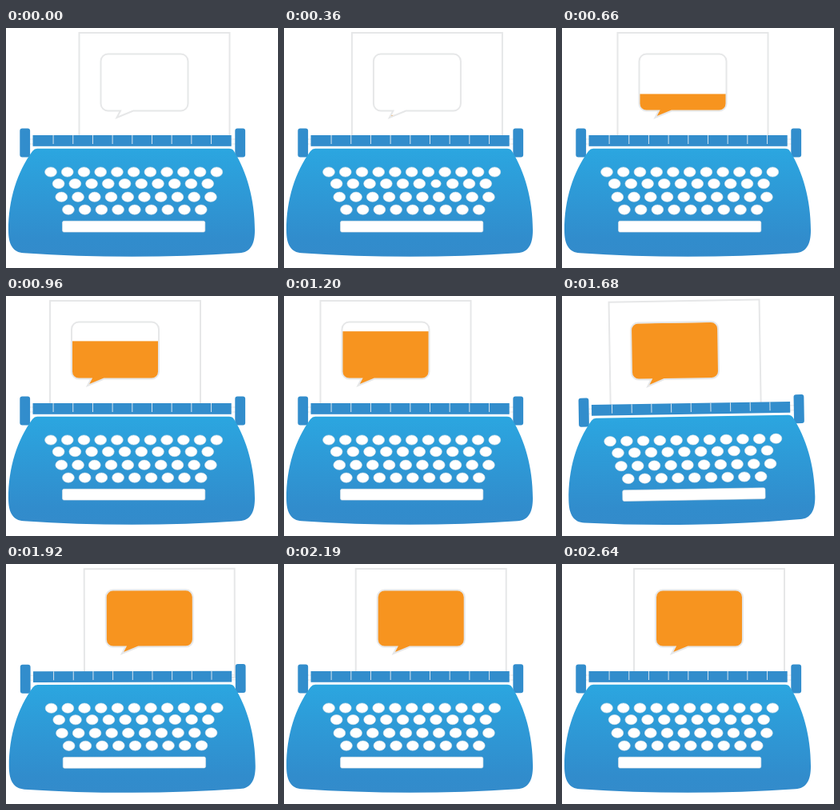
Animation of 340 by 300 pixels, one loop 3 s. Source, as an HTML page:

```html
<!DOCTYPE html>
<html lang="en">
<head>
<meta charset="utf-8">
<title>Typewriter</title>
<style>
  html, body { margin: 0; width: 100%; height: 100%; overflow: hidden; background: #fff; }
  svg { display: block; width: 340px; height: 300px; }
  .line { fill: none; stroke: #e6e7e8; stroke-width: 2; }
  .blue { fill: #328dcc; }
  .white { fill: #fff; stroke: #dfe3e6; stroke-width: .6; }
</style>
</head>
<body>
<svg viewBox="0 0 340 300">
  <defs>
    <linearGradient id="shade" x1="0" y1="0" x2="0" y2="1">
      <stop offset="0" stop-color="#2ba6e0"/>
      <stop offset=".85" stop-color="#318ccc"/>
      <stop offset="1" stop-color="#338bcb"/>
    </linearGradient>
    <path id="bubble" d="M36 32.5H127a9 9 0 0 1 9 9V94.5a9 9 0 0 1-9 9H67.5L47 112L51.5 103.5H36a9 9 0 0 1-9-9V41.5a9 9 0 0 1 9-9Z"/>
    <clipPath id="inside"><use href="#bubble"/></clipPath>
  </defs>
  <g id="machine">
    <g id="paper">
      <rect class="line" y="6" width="188" height="136" style="fill:#fff"/>
      <g clip-path="url(#inside)">
        <rect id="ink" x="20" width="125" height="90" fill="#f7941f"/>
      </g>
      <use href="#bubble" class="line"/>
    </g>
    <path class="line" style="stroke-width:1" d="M30 139H34M30 145H34M281 139H287M281 145H287"/>
    <rect class="blue" x="17.3" y="125.4" width="12.8" height="36" rx="3"/>
    <rect class="blue" x="286.3" y="125.4" width="12.8" height="36" rx="3"/>
    <rect class="blue" x="33.5" y="134" width="248.2" height="13.8"/>
    <g id="ticks" stroke="#d5e3ee" stroke-width="1"></g>
    <path fill="url(#shade)" d="M39 150.8H279Q283 150.8 285 154C301 180 311 214 311 253C311 271 305 280.500 292 281.300Q225 285.800 157 285.800Q89 285.800 22 281.300C9 280.500 3 271 3 253C3 214 14 180 33 154Q35.500 150.800 39 150.800Z"/>
    <g id="keys"></g>
    <rect class="white" x="70.5" y="241.3" width="178.3" height="13.8" rx="2"/>
  </g>
</svg>
<script>
  const LOOP = 3000, STEP = 30;
  const $ = id => document.getElementById(id);

  function add(parent, tag, attrs) {
    const el = document.createElementNS('http://www.w3.org/2000/svg', tag);
    for (const k in attrs) el.setAttribute(k, attrs[k]);
    return parent.appendChild(el);
  }

  for (let i = 1; i < 10; i++) {
    const x = 34.4 + i * 24.68;
    add($('ticks'), 'line', { x1: x, x2: x, y1: 134, y2: 145 });
  }

  // first x, y, count
  const rows = [[56, 180, 11], [65.6, 194.6, 10], [69.3, 211.2, 10], [77.9, 227.1, 9]]
    .map(([x, y, n]) => Array.from({ length: n }, (_, i) =>
      add($('keys'), 'ellipse', { class: 'white', cx: x + i * 20.73, cy: y })));

  // time, row, column
  const presses = [[210, 0, 3], [360, 1, 6], [510, 2, 4], [720, 3, 2], [840, 1, 3], [1050, 3, 6]];

  // time, left edge of the paper
  const slide = [[120, 91.5], [660, 69.5], [960, 55], [1200, 45.5], [1350, 42], [1470, 41.5],
    [1680, 57.3], [1800, 82], [1920, 97.5], [2070, 93], [2190, 89.7], [2280, 90]];

  // Smooth curve through the points, flat at both ends
  function curve(pts, t) {
    const last = pts.length - 1;
    if (t <= pts[0][0]) return pts[0][1];
    if (t >= pts[last][0]) return pts[last][1];
    const i = pts.findIndex(p => p[0] > t) - 1;
    const slope = j => j < 1 || j >= last ? 0
      : (pts[j + 1][1] - pts[j - 1][1]) / (pts[j + 1][0] - pts[j - 1][0]);
    const [t0, a] = pts[i], [t1, b] = pts[i + 1];
    const d = t1 - t0, u = (t - t0) / d, v = 1 - u;
    return a * v * v * (1 + 2 * u) + b * u * u * (3 - 2 * u)
      + d * u * v * (slope(i) * v - slope(i + 1) * u);
  }

  const clamp = x => Math.max(0, Math.min(1, x));

  // cubic-bezier(.25, .1, .25, 1)
  function ease(x) {
    let lo = 0, hi = 1;
    const bez = (a, b, s) => 3 * a * s * (1 - s) ** 2 + 3 * b * s * s * (1 - s) + s ** 3;
    for (let i = 0; i < 20; i++) {
      const mid = (lo + hi) / 2;
      if (bez(.25, .25, mid) < x) lo = mid; else hi = mid;
    }
    return bez(.1, 1, lo);
  }

  // Jolt of the carriage return, then a damped shake
  function jolt(t) {
    if (t < 1680) {
      const u = clamp((t - 1530) / 150);
      return u * u * (3 - 2 * u);
    }
    if (t > 2280) return 0;
    const s = (t - 1680) / 120;
    return Math.cos(Math.PI * s) * .38 ** s;
  }

  function draw(now) {
    const t = Math.floor(now % LOOP / STEP) * STEP;
    const k = jolt(t);
    $('machine').setAttribute('transform', `translate(${3.5 * k} 0) rotate(${-.96 * k} 157 143)`);
    $('paper').setAttribute('transform', `translate(${curve(slide, t)} 0)`);
    $('ink').setAttribute('y', 112 - 80 * ease(clamp((t - 265) / 1700)));
    rows.forEach((row, r) => row.forEach((key, c) => {
      const down = presses.some(p => p[1] === r && p[2] === c && t >= p[0] && t < p[0] + 90);
      key.setAttribute('rx', down ? 6.2 : 7.4);
      key.setAttribute('ry', down ? 5 : 6.1);
    }));
  }

  const start = performance.now();
  function tick() {
    draw(performance.now() - start);
    requestAnimationFrame(tick);
  }
  tick();
</script>
</body>
</html>
```
